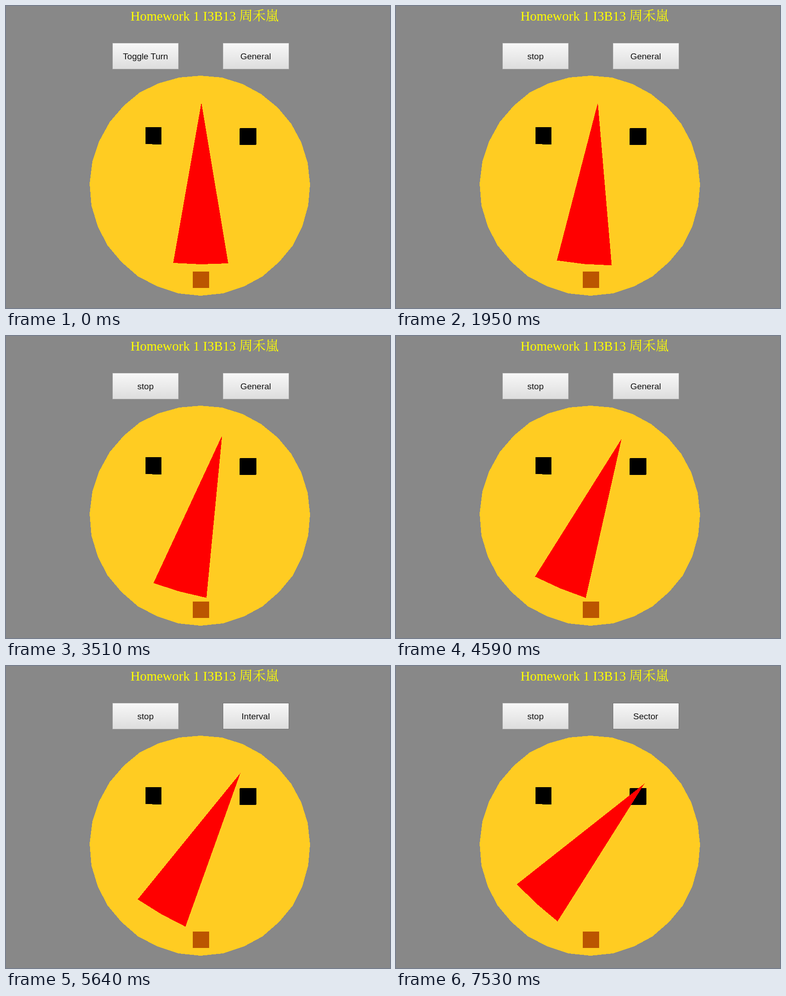
An HTML page that plays this animation: 845 px wide and 663 px high, repeating every 8000 ms.

```html
<!DOCTYPE html>
<html lang="zh-Hant">
<head>
<meta charset="utf-8">
<title>Homework 1</title>
<style>
html, body { margin: 0; width: 100%; height: 100%; overflow: hidden; background: #888; }
svg { display: block; }
.shape { shape-rendering: crispEdges; }
.title { font: 300 29px "Liberation Serif", "Noto Serif CJK TC", "Noto Sans CJK TC", "Noto Sans CJK", serif; fill: #ff0; }
.button rect { fill: url(#sheen); stroke: #a6a6a6; }
.button.hover rect { stroke: #6e6e6e; }
.button text { font: 19px "Liberation Sans", Arial, sans-serif; text-anchor: middle; fill: #111; }
</style>
</head>
<body>
<svg width="845" height="663" viewBox="0 0 845 663">
  <defs>
    <linearGradient id="sheen" x2="0" y2="1">
      <stop stop-color="#f8f8f8"/>
      <stop offset="1" stop-color="#ddd"/>
    </linearGradient>
  </defs>
  <text class="title" x="274" y="32">Homework 1 I3B13 周禾嵐</text>
  <g class="button" id="turn" transform="translate(234 81)">
    <rect x=".5" y=".5" width="145" height="57"/>
    <text x="73" y="36">Toggle Turn</text>
  </g>
  <g class="button" id="mode" transform="translate(477 81)">
    <rect x=".5" y=".5" width="145" height="57"/>
    <text x="72.5" y="36">General</text>
  </g>
  <g class="shape">
    <polygon fill="#ffcc22" points="428,153 475,157 520,171 561,193 598,223 628,259 650,300 664,345
      669,392 665,438 652,484 631,526 601,562 564,594 523,616 477,631
      428,636 380,631 334,616 291,594 254,562 223,525 202,484 188,438
      184,390 190,342 205,297 228,255 259,219 294,190 335,170 381,157"/>
    <path d="M307 266H342V304H322V303H307Z"/>
    <rect x="514" y="268" width="37" height="37" rx="2"/>
    <rect x="411" y="583" width="36" height="36" fill="#bb5500"/>
    <polygon id="nose" fill="#f00" points="430,212 489,565 428.5,567 368,564"/>
  </g>
</svg>
<script>
const LOOP = 8000, STEP = 30, DEGREES = 0.2;
const TURN_START = 1260, FREEZE = 6750, RESUME = 7530;
const get = id => document.getElementById(id);
const within = (t, from, to) => t >= from && t < to;

function setButton(id, label, hover) {
  const button = get(id), text = button.querySelector("text");
  button.classList.toggle("hover", hover);
  if (text.textContent !== label) text.textContent = label;
}

function noseAngle(t) {
  // The picture stalls from FREEZE until RESUME, then catches up
  const seen = t >= RESUME ? RESUME : Math.min(t, FREEZE);
  return DEGREES * Math.max(0, Math.floor((seen - TURN_START) / STEP));
}

function draw() {
  const t = performance.now() % LOOP;
  get("nose").setAttribute("transform", `rotate(${noseAngle(t)} 428 388)`);
  setButton("turn", t < 1230 ? "Toggle Turn" : "stop", within(t, 960, 1650));
  setButton("mode", t < 5430 ? "General" : t < 6360 ? "Interval" : "Sector",
    within(t, 690, 780) || t >= 4980);
  requestAnimationFrame(draw);
}
draw();
</script>
</body>
</html>
```
